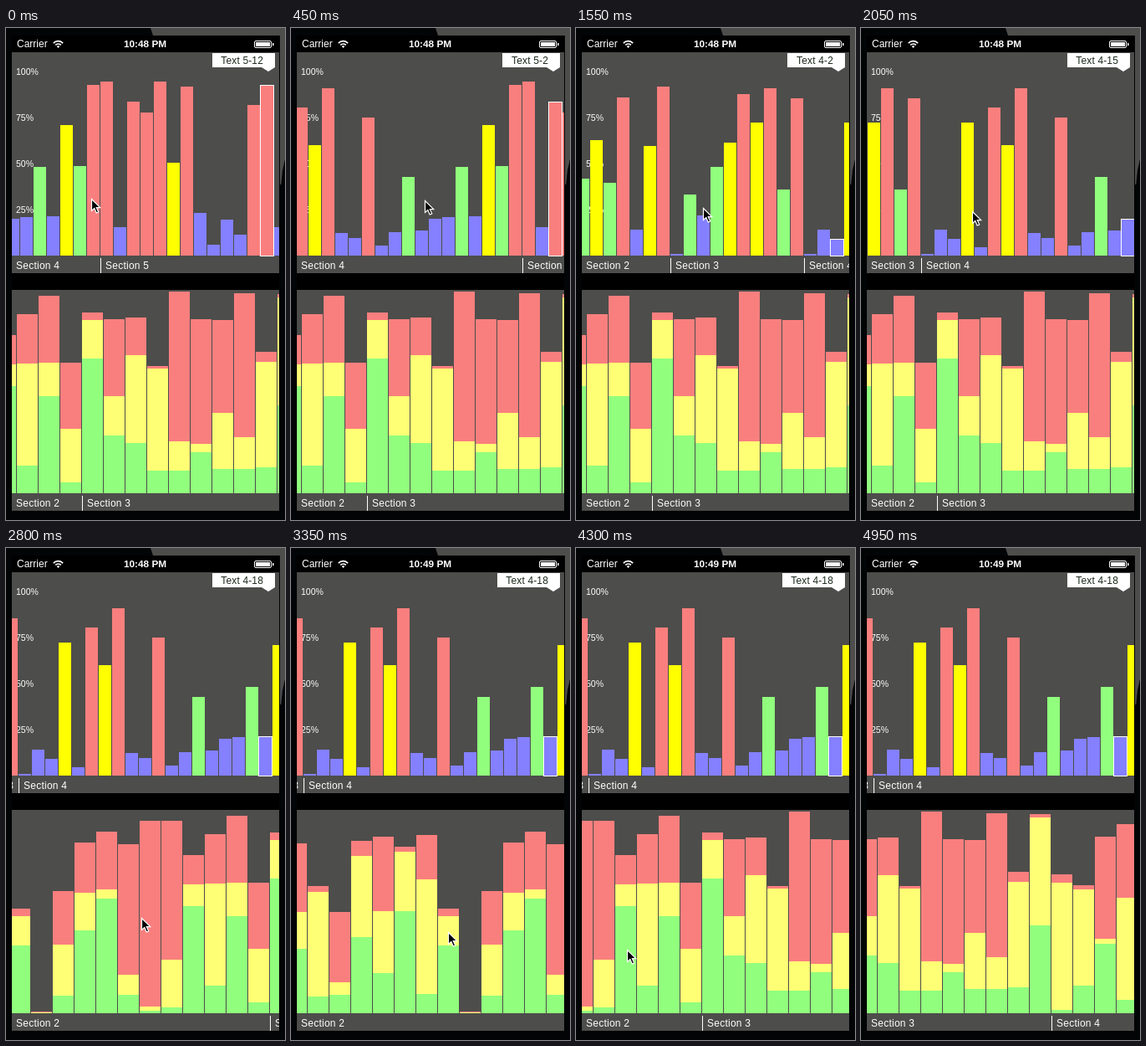
Write an HTML page with a canvas that moves like this. It is 334 px wide and 588 px high and loops after 5 s.

```html
<!DOCTYPE html>
<html lang="en">
<head>
<meta charset="utf-8">
<title>Scrolling bar charts</title>
<style>
  html, body { margin: 0; width: 100%; height: 100%; overflow: hidden; background: #020406; }
  canvas { display: block; width: 334px; height: 588px; }
</style>
</head>
<body>
<canvas id="stage" width="334" height="588"></canvas>
<script>
const ctx = document.getElementById('stage').getContext('2d');
const LOOP = 5000, STEP = 50;
const SANS = '"Liberation Sans", Arial, sans-serif';
const GRAY = '#4d4d4b', BEZEL = '#020406';
const RED = '#f97f7e', YELLOW = '#ffff00', GREEN = '#91ff7d', BLUE = '#8480ff', PALE = '#ffff75';

// Bar tops in screen pixels
const topBars = [
  180, 134, 185, 83, 241, 141, 70,
  270, 199, 224, 166, 137, 79, 113, 72, 193, 84,
  270, 241, 252, 113, 262, 95, 140, 72, 245, 251, 107, 260, 244, 178, 242, 228, 226, 166, 225, 116, 165, 68,
  64, 238, 88, 101, 64, 161, 70, 221, 259, 229, 247, 92, 68, 238
];
// Red, yellow and green tops of each stack
const stacks = [
  [353, 435, 479], [404, 411, 536], [435, 519, 534], [350, 368, 465], [345, 434, 508],
  [357, 363, 434], [343, 396, 533], [431, 440, 475], [554, 555, 556], [410, 474, 535],
  [352, 412, 457], [339, 408, 419], [354, 510, 534], [326, 548, 553], [326, 492, 549],
  [367, 402, 428], [342, 401, 523], [320, 400, 440], [400, 479, 543],
  [340, 349, 395], [348, 440, 487], [346, 391, 496], [404, 407, 529], [315, 494, 529],
  [348, 497, 507], [349, 460, 527], [317, 489, 527], [387, 399, 525], [318, 322, 451],
  [390, 400, 552], [403, 408, 523], [345, 467, 473], [330, 418, 540]
];

const upper = { y: 29, h: 264, base: 272, pitch: 16, origin: 17,
  sections: [[2, -12], [3, 7], [4, 17], [5, 39]] };
const lower = { y: 313, h: 264, base: 556, pitch: 26, origin: 19,
  sections: [[2, -4], [3, 19], [4, 29]] };

// Key positions: time, value
const upperScroll = [[0, -239], [450, -75], [900, 125], [1350, 265], [1550, 273], [2050, 72], [2500, 15]];
const lowerScroll = [[2450, 91], [2800, 316], [3400, 490], [3850, 478], [4500, 30], [4950, -32]];
const cursorX = [[0, 102], [450, 160], [900, 207], [1350, 208], [1550, 152], [2050, 133], [2450, 112],
  [2800, 162], [3400, 188], [3850, 121], [4350, 60]];
const cursorY = [[0, 204], [900, 208], [1550, 215], [2050, 219], [2450, 430], [2800, 442], [3850, 472], [4350, 480]];

// Monotone cubic through the keys, held at both ends
function track(keys, t) {
  const last = keys.length - 1;
  if (t <= keys[0][0]) return keys[0][1];
  if (t >= keys[last][0]) return keys[last][1];
  const slope = i => (keys[i + 1][1] - keys[i][1]) / (keys[i + 1][0] - keys[i][0]);
  const tangent = i => {
    if (i === 0) return slope(0);
    if (i === last) return 0;
    const a = slope(i - 1), b = slope(i);
    return a * b <= 0 ? 0 : 2 * a * b / (a + b);
  };
  const i = keys.findIndex(k => k[0] > t) - 1;
  const [t0, v0] = keys[i], [t1, v1] = keys[i + 1];
  const d = t1 - t0, u = (t - t0) / d, w = 1 - u;
  return v0 * (1 + 2 * u) * w * w + tangent(i) * d * u * w * w
    + v1 * u * u * (3 - 2 * u) - tangent(i + 1) * d * u * u * w;
}

function rect(x, y, w, h, color) {
  ctx.fillStyle = color;
  ctx.fillRect(x, y, w, h);
}

function poly(points, color) {
  ctx.fillStyle = color;
  ctx.beginPath();
  points.forEach(([x, y]) => ctx.lineTo(x, y));
  ctx.closePath();
  ctx.fill();
}

function text(str, x, y, size, { color = '#fff', align = 'left', weight = '', spacing = 0 } = {}) {
  ctx.font = `${weight} ${size}px ${SANS}`;
  ctx.letterSpacing = spacing + 'px';
  ctx.textAlign = align;
  ctx.textBaseline = 'middle';
  ctx.fillStyle = color;
  ctx.fillText(str, x, y);
}

function inside(chart, draw) {
  ctx.save();
  ctx.beginPath();
  ctx.rect(7, chart.y, 320, chart.h);
  ctx.clip();
  rect(7, chart.y, 320, chart.h, GRAY);
  draw();
  ctx.restore();
}

const barX = (chart, scroll, i) => scroll + (i - chart.origin) * chart.pitch;

function drawSections(chart, scroll) {
  const y = chart.base + 12.5;
  chart.sections.forEach(([id, start], n) => {
    const x = barX(chart, scroll, start);
    const next = chart.sections[n + 1];
    const end = next ? barX(chart, scroll, next[1]) : Infinity;
    rect(x, chart.base + 3, 1, 18, '#fff');
    text('Section ' + id, Math.min(Math.max(12, x + 6), end - 58), y, 12, { spacing: .25 });
  });
}

function levelColor(top) {
  if (top < 108) return RED;
  if (top < 163) return YELLOW;
  return top < 218 ? GREEN : BLUE;
}

function drawUpper(scroll) {
  inside(upper, () => {
    ['100%', '75%', '50%', '25%'].forEach((s, i) => text(s, 12, 53 + i * 55, 10.5));
    topBars.forEach((top, i) => rect(barX(upper, scroll, i), top, 15, 272 - top, levelColor(top)));
    drawSections(upper, scroll);

    const picked = Math.floor((314 - scroll) / 16) + upper.origin;
    const top = topBars[picked];
    ctx.strokeStyle = '#fff';
    ctx.lineWidth = 1;
    ctx.strokeRect(barX(upper, scroll, picked) - .5, top + .5, 16, 272 - top);

    const [id, start] = upper.sections.filter(s => s[1] <= picked).pop();
    drawFlag(`Text ${id}-${picked - start}`);
  });
}

function drawFlag(label) {
  const left = label.length > 8 ? 247 : 253;
  poly([[left, 30], [322, 30], [322, 47], [314, 52], [306, 47], [left, 47]], '#fff');
  text(label, 308, 39.5, 12, { color: '#1d2a1d', align: 'right', spacing: .15 });
}

function drawLower(scroll) {
  inside(lower, () => {
    stacks.forEach(([r, y, g], i) => {
      const x = barX(lower, scroll, i);
      rect(x, r, 25, y - r, RED);
      rect(x, y, 25, g - y, PALE);
      rect(x, g, 25, 556 - g, GREEN);
    });
    drawSections(lower, scroll);
  });
}

function drawPhone() {
  rect(0, 0, 334, 588, BEZEL);
  poly([[173, 0], [334, 0], [334, 157], [331, 187], [328, 187], [328, 9], [176, 9]], GRAY);
  poly([[334, 157], [334, 190], [329, 190], [331, 170]], BEZEL);
  rect(7, 9, 320, 568, '#000');
}

function drawStatus(clock) {
  text('Carrier', 13, 20, 12);
  text(clock, 166.5, 20, 11.8, { align: 'center', weight: 'bold' });

  ctx.strokeStyle = '#fff';
  ctx.lineWidth = 1.7;
  [4.5, 7.8].forEach(r => {
    ctx.beginPath();
    ctx.arc(62.5, 23.5, r, -Math.PI * .76, -Math.PI * .24);
    ctx.stroke();
  });
  poly([[60.7, 21.8], [62.5, 21], [64.3, 21.8], [62.5, 24]], '#fff');

  ctx.lineWidth = 1;
  ctx.beginPath();
  ctx.roundRect(297.5, 15.5, 20, 8, 1.5);
  ctx.stroke();
  rect(299, 17, 17, 5, '#fff');
  rect(319, 18, 1.5, 3, '#fff');
}

function drawCursor(x, y) {
  ctx.save();
  ctx.translate(x, y);
  ctx.beginPath();
  [[.5, .5], [.5, 14.5], [3.8, 11.5], [6.2, 17], [8.7, 16], [6.3, 10.7], [10.7, 10.7]]
    .forEach(p => ctx.lineTo(...p));
  ctx.closePath();
  ctx.fillStyle = '#000';
  ctx.fill();
  ctx.strokeStyle = '#fff';
  ctx.lineWidth = 1.2;
  ctx.stroke();
  ctx.restore();
}

function render(t) {
  drawPhone();
  drawStatus(t < 3300 ? '10:48 PM' : '10:49 PM');
  drawUpper(Math.round(track(upperScroll, t)));
  drawLower(Math.round(track(lowerScroll, t)));
  if (t < 4400) drawCursor(Math.round(track(cursorX, t)), Math.round(track(cursorY, t)));
}

const begin = performance.now();
function tick() {
  const t = (performance.now() - begin) % LOOP;
  render(Math.floor(t / STEP) * STEP);
  requestAnimationFrame(tick);
}
tick();
</script>
</body>
</html>
```
